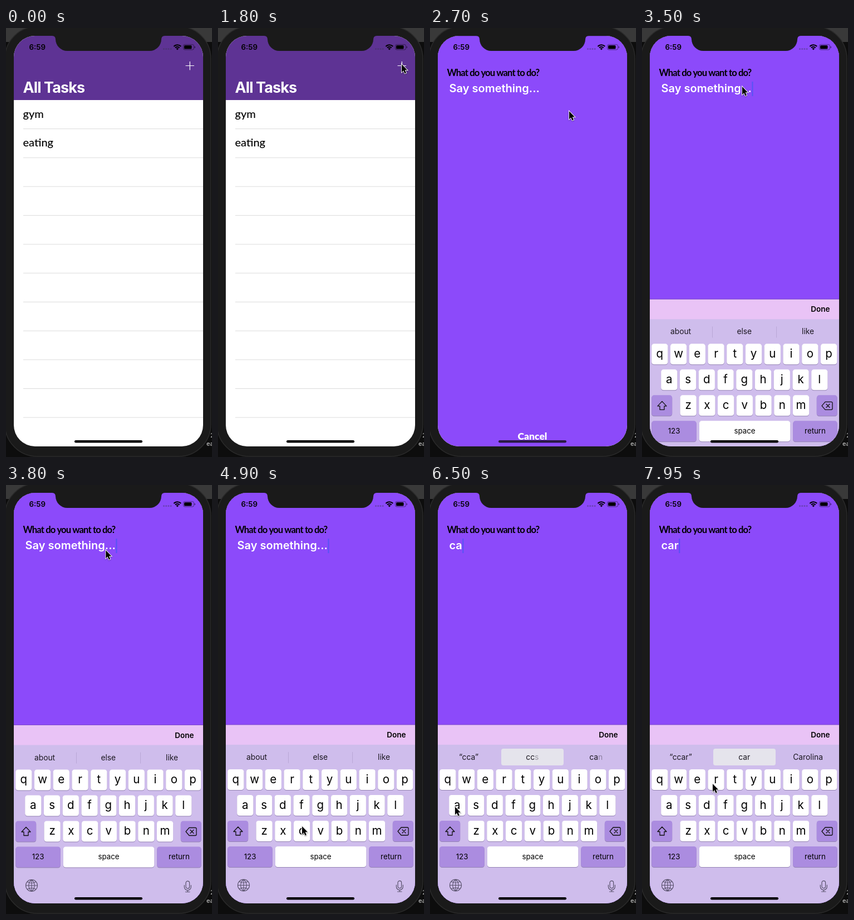
Animation, 370 px wide and 768 px high, one loop 8 s. Source, as an HTML page with a canvas:

```html
<!DOCTYPE html>
<html lang="en">
<head>
<meta charset="utf-8">
<title>Task list</title>
<style>
  html, body { margin: 0; width: 100%; height: 100%; overflow: hidden; background: #111; }
  canvas { display: block; width: 370px; height: 768px; }
</style>
</head>
<body>
<canvas></canvas>
<script>
const LOOP = 8000, W = 370, H = 768;
const SANS = 'Inter, Roboto, sans-serif', ROUND = 'Lato, "Open Sans", sans-serif';
const canvas = document.querySelector('canvas');
const ctx = canvas.getContext('2d');
const ratio = window.devicePixelRatio || 1;
canvas.width = W * ratio;
canvas.height = H * ratio;

const MODAL_AT = 2000, KEYBOARD_AT = 3330;
const KEYBOARD_TOP = 429, SCREEN_BOTTOM = 749;

// Pointer tip: time, x, y
const pointerPath = [
  [550, 372, 425], [800, 357, 400], [1500, 330, 65], [2100, 330, 65],
  [2650, 250, 149], [2800, 250, 149], [3300, 180, 105], [3700, 180, 105],
  [4800, 151, 611], [5450, 151, 611], [6300, 45, 576], [6650, 45, 576],
  [7400, 127, 535], [8000, 127, 535]
];

// What the field and the suggestion bar hold from each time on
const typing = [
  { at: KEYBOARD_AT, value: '', words: ['about', 'else', 'like'] },
  { at: 5350, value: 'c', words: ['“cc”', 'cc', 'ca'] },
  { at: 6400, value: 'ca', words: ['“cca”', 'ccs', 'can'] },
  { at: 7600, value: 'car', words: ['“ccar”', 'car', 'Carolina'] }
];

const clamp = v => Math.max(0, Math.min(1, v));
const ease = v => v * v * (3 - 2 * v);

function spring(ms, speed) {
  const x = Math.max(0, ms) / 1000 * speed;
  return 1 - (1 + x) * Math.exp(-x);
}

function rect(x, y, w, h, color) {
  ctx.fillStyle = color;
  ctx.fillRect(x, y, w, h);
}

function round(x, y, w, h, r, color) {
  ctx.beginPath();
  ctx.roundRect(x, y, w, h, r);
  ctx.fillStyle = color;
  ctx.fill();
}

function stroke(path, color, width = 1.3) {
  ctx.strokeStyle = color;
  ctx.lineWidth = width;
  ctx.lineJoin = ctx.lineCap = 'round';
  ctx.stroke(new Path2D(path));
}

function setFont(size, weight, family, spacing) {
  ctx.font = `${weight} ${size}px ${family}`;
  ctx.letterSpacing = spacing + 'px';
}

function text(str, x, y, { size, weight = 400, family = SANS, color = '#000', align = 'left', spacing = 0 }) {
  setFont(size, weight, family, spacing);
  ctx.textAlign = align;
  ctx.fillStyle = color;
  ctx.fillText(str, x, y);
}

function drawBackdrop() {
  rect(0, 0, W, H, '#0d0d0d');
  rect(0, 0, W, 25, '#393939');
  text('2', 367, 733, { size: 11, color: '#bbb' });
  text('ea', 360, 748, { size: 11, weight: 600, color: '#aaa' });
  round(-2, -3, 370, 770, 58, '#1a1a1a');
  ctx.strokeStyle = '#2b2b2b';
  ctx.lineWidth = 1.5;
  ctx.stroke();
}

function drawList() {
  rect(14, 14, 340, 735, '#fff');
  rect(14, 14, 340, 115, '#5e3394');
  text('All Tasks', 30.5, 116, { size: 27, weight: 700, color: '#fff', spacing: -0.9 });
  stroke('M323 67.5H337.5M330.3 60.3V74.8', '#fff', 1.2);
  text('gym', 30.5, 161, { size: 20, weight: 500, family: ROUND });
  text('eating', 30.5, 212, { size: 20, weight: 500, family: ROUND });
  for (let i = 0; i < 11; i++) rect(31, 180 + i * 51.67, 323, 1, '#dcdcdc');
}

function drawForm(t, entry) {
  rect(14, 14, 340, 735, '#8c4afa');
  text('What do you want to do?', 30.5, 86, { size: 16.5, weight: 700, family: ROUND, spacing: -0.85 });
  const shown = entry && entry.value || 'Say something...';
  text(shown, 34.5, 115, { size: 20, weight: 600, color: '#fff' });
  if (entry && (t - entry.at) % 1000 < 620) {
    rect(35 + ctx.measureText(shown).width, 96, 2, 26, '#5554f5');
  }
  text('Cancel', 184, 737, { size: 17.5, weight: 900, family: ROUND, color: '#fff', align: 'center' });
}

function key(x, y, w, label, size, color = '#fff') {
  round(x, y + 1, w, 37, 4.5, '#9482b4');
  round(x, y, w, 37, 4.5, color);
  text(label, x + w / 2, y + (size > 15 ? 24.5 : 22.5), { size, align: 'center' });
}

function drawSuggestions(t, entry) {
  const previous = typing[typing.indexOf(entry) - 1];
  if (entry.value) round(128, 43, 112, 30, 4, '#e5e4ec');
  else for (const x of [126, 241]) rect(x, 49, 1, 20, '#b9a7d6');
  entry.words.forEach((word, i) => {
    const old = previous ? previous.words[i] : word;
    const kept = i === 0 || word.startsWith(old) ? Math.min(old.length, word.length) : 0;
    const head = i === 0 ? word : word.slice(0, kept);
    const style = { size: 13.8, color: '#1b1720' };
    setFont(style.size, 400, SANS, 0);
    const x = 69.5 + i * 114.3 - ctx.measureText(word).width / 2;
    text(head, x, 63, style);
    const offset = ctx.measureText(head).width;
    ctx.globalAlpha = previous ? clamp((t - entry.at) / 280) : 1;
    text(word.slice(head.length), x + offset, 63, style);
    ctx.globalAlpha = 1;
  });
}

function drawKeyboard(t, entry) {
  const dark = '#ab8ce0', pitch = 33.75;
  ctx.save();
  ctx.translate(0, SCREEN_BOTTOM - (SCREEN_BOTTOM - KEYBOARD_TOP) * spring(t - KEYBOARD_AT, 18.5));
  rect(14, 0, 340, 330, '#cfbdec');
  rect(14, 0, 340, 36, '#e9c3f6');
  rect(14, -0.5, 340, 1, '#7b45cc');
  text('Done', 337.5, 23, { size: 13.5, weight: 600, align: 'right' });
  drawSuggestions(t, entry);

  [['qwertyuiop', 17.2], ['asdfghjkl', 34.2], ['zxcvbnm', 68.5]].forEach(([letters, left], row) => {
    [...letters].forEach((c, i) => key(left + i * pitch, 80 + row * 46, 29.2, c, 20.5));
  });
  key(17.2, 172, 37, '', 13, dark);
  key(313.8, 172, 37, '', 13, dark);
  key(17.2, 218, 80.6, '123', 13.3, dark);
  key(102.8, 218, 163.5, 'space', 13.3);
  key(271.2, 218, 79.6, 'return', 13.3, dark);

  // Shift and delete
  stroke('M36 183L44 191.5H40V198H32V191.5H28Z', '#111');
  stroke('M329 184H340Q342 184 342 186V196Q342 198 340 198H329L323 191Z', '#111');
  stroke('M331 188L337 194M337 188L331 194', '#111');

  // Globe and microphone
  stroke('M35.5 287.5a10.5 10.5 0 1 0 21 0a10.5 10.5 0 1 0 -21 0H56.5' +
    'M46 277V298M46 277C39 283 39 292 46 298C53 292 53 283 46 277' +
    'M38.5 281Q46 285 53.5 281M38.5 294Q46 290 53.5 294', '#57506a', 1.1);
  stroke('M323 283a3.3 3.3 0 0 1 6.6 0V289.5a3.3 3.3 0 0 1 -6.6 0Z' +
    'M320.3 287V290a6 6 0 0 0 12 0V287M326.3 296V299M322.5 299H330', '#57506a', 1.2);
  ctx.restore();
}

function drawStatus(homeColor) {
  round(89, 0, 190, 41, [0, 0, 21, 21], '#1a1a1a');
  ctx.fill(new Path2D('M83 13V14Q89 14 89 21H90V13ZM285 13V14Q279 14 279 21H278V13Z'));
  text('6:59', 41.5, 39, { size: 13.3, weight: 600 });
  for (let i = 0; i < 4; i++) round(282 + i * 4.2, 36, 3, 3, 1.5, 'rgba(55,55,75,.38)');
  ctx.strokeStyle = '#000';
  ctx.lineWidth = 2.1;
  ctx.lineCap = 'butt';
  for (const r of [5.2, 8.8]) {
    ctx.beginPath();
    ctx.arc(307.8, 39, r, -Math.PI * 0.76, -Math.PI * 0.24);
    ctx.stroke();
  }
  ctx.beginPath();
  ctx.moveTo(307.8, 39.5);
  ctx.arc(307.8, 39, 3, -Math.PI * 0.76, -Math.PI * 0.24);
  ctx.fillStyle = '#000';
  ctx.fill();
  ctx.beginPath();
  ctx.roundRect(318.5, 29.5, 19, 9.5, 2.8);
  ctx.strokeStyle = 'rgba(0,0,0,.45)';
  ctx.lineWidth = 1;
  ctx.stroke();
  round(320, 31, 13.5, 6.5, 1.5, '#000');
  round(338.6, 32.7, 1.4, 3.2, 0.7, 'rgba(0,0,0,.5)');
  round(123, 738, 122, 4.4, 2.2, homeColor);
}

function drawPointer(t) {
  const next = pointerPath.findIndex(p => p[0] > t);
  if (next < 1) return;
  const [t0, x0, y0] = pointerPath[next - 1], [t1, x1, y1] = pointerPath[next];
  const k = ease((t - t0) / (t1 - t0));
  ctx.save();
  ctx.translate(x0 + (x1 - x0) * k, y0 + (y1 - y0) * k);
  const arrow = new Path2D('M0 0V14.2L3.2 11.2L5.5 16.4L7.9 15.4L5.7 10.3H10Z');
  ctx.shadowColor = 'rgba(0,0,0,.35)';
  ctx.shadowBlur = 2 * ratio;
  ctx.shadowOffsetY = ratio;
  ctx.strokeStyle = '#fff';
  ctx.lineWidth = 1.8;
  ctx.lineJoin = 'miter';
  ctx.stroke(arrow);
  ctx.shadowColor = 'transparent';
  ctx.fillStyle = '#000';
  ctx.fill(arrow);
  ctx.restore();
}

function draw(t) {
  const entry = typing.filter(e => e.at <= t).pop();
  ctx.setTransform(ratio, 0, 0, ratio, 0, 0);
  drawBackdrop();

  ctx.save();
  ctx.beginPath();
  ctx.roundRect(14, 14, 340, 735, 38);
  ctx.clip();
  drawList();
  if (t >= MODAL_AT) {
    ctx.save();
    ctx.translate(0, 735 * (1 - spring(t - MODAL_AT, 14)));
    drawForm(t, entry);
    ctx.restore();
  }
  if (entry) drawKeyboard(t, entry);
  ctx.restore();

  drawStatus(t > MODAL_AT + 150 && !entry ? '#2b1a45' : '#000');
  drawPointer(t);
}

function tick() {
  draw(performance.now() % LOOP);
  requestAnimationFrame(tick);
}
tick();
</script>
</body>
</html>
```
